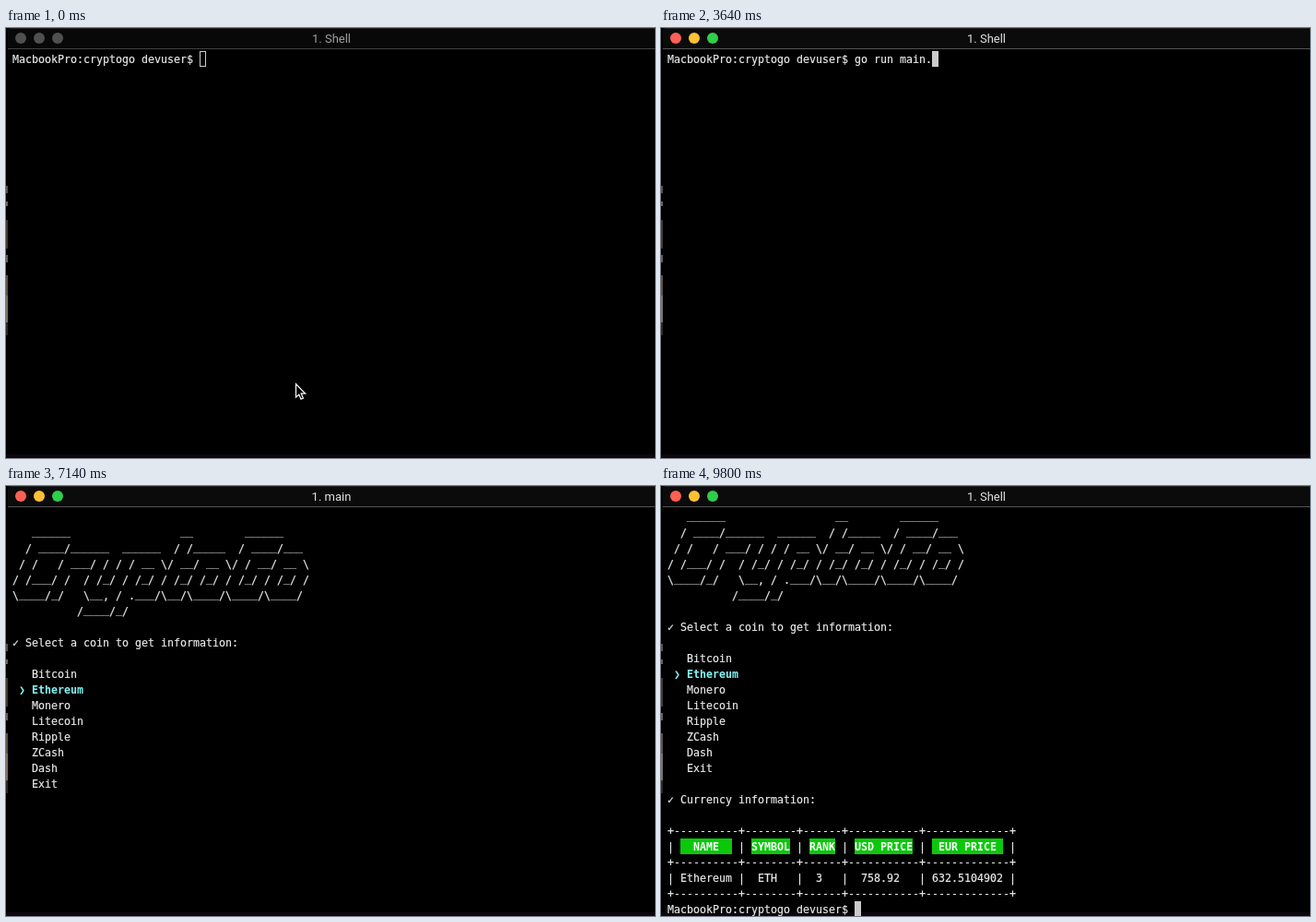
Recreate the animation shown at these times as an HTML page with a canvas. Size 704 by 466 pixels, loop 9.87 s.

```html
<!DOCTYPE html>
<html lang="en">
<head>
<meta charset="utf-8">
<title>Terminal</title>
<style>
  html, body { margin: 0; width: 100%; height: 100%; overflow: hidden; background: #000; }
  canvas { display: block; width: 704px; height: 466px; }
</style>
</head>
<body>
<canvas id="stage" width="704" height="466"></canvas>
<script>
const ctx = document.getElementById('stage').getContext('2d');
const LOOP = 9870, COL = 7, ROW = 17;
const MONO = '11.63px "DejaVu Sans Mono", monospace';
const TEXT = '#e8e8e8', BLOCK = '#cbcbcb', CYAN = '#86f5f5', GREEN = '#0bc80b';
const PROMPT = 'MacbookPro:cryptogo devuser$ ';
const COMMAND = 'go run main.go';
const KEY_TIMES = [1400, 1540, 1820, 2100, 2240, 2450, 2520, 2660, 2870, 3010, 3220, 3640, 3850, 3990];
const ACTIVE = 560, RETURN = 4200, MENU = 4690, CHOSEN = 7560, RESULT = 8610;
const LOGO = String.raw`
   ______                 __        ______
  / ____/______  ______  / /_____  / ____/___
 / /   / ___/ / / / __ \/ __/ __ \/ / __/ __ \
/ /___/ /  / /_/ / /_/ / /_/ /_/ / /_/ / /_/ /
\____/_/   \__, / .___/\__/\____/\____/\____/
          /____/_/`.split('\n');
const COINS = ['Bitcoin', 'Ethereum', 'Monero', 'Litecoin', 'Ripple', 'ZCash', 'Dash', 'Exit'];
const PICKS = [[MENU, 0], [5530, 1], [5950, 2], [6300, 3], [6650, 2], [7000, 1]];
const TITLES = [[0, '1. Shell'], [MENU, '1. link'], [5320, '1. main'], [9170, '1. Shell']];
const RULE = '+' + [10, 8, 6, 11, 13].map(n => '-'.repeat(n) + '+').join('');
const HEADERS = [[2, '  NAME  '], [13, 'SYMBOL'], [22, 'RANK'], [29, 'USD PRICE'], [41, ' EUR PRICE ']];

const latest = (steps, t) => steps.filter(([start]) => t >= start).pop()[1];

function rect(x, y, w, h, color) {
  ctx.fillStyle = color;
  ctx.fillRect(x, y, w, h);
}

function print(col, row, text, color = TEXT, bold = false, lift = 0) {
  const x = 7 + col * COL, y = 38 + row * ROW - lift;
  ctx.font = (bold ? 'bold ' : '') + MONO;
  ctx.fillStyle = ctx.strokeStyle = color;
  ctx.fillText(text, x, y);
  if (bold) return;
  // a hairline gives regular text its heavier smoothing
  ctx.lineWidth = .2;
  ctx.strokeText(text, x, y);
}

function block(col, row, filled = true) {
  const x = 7 + col * COL, y = 25 + row * ROW;
  if (filled) return rect(x, y, COL, ROW, BLOCK);
  ctx.strokeStyle = BLOCK;
  ctx.lineWidth = 1;
  ctx.strokeRect(x + .5, y + .5, COL - 1, ROW - 1);
}

function drawWindow(t) {
  const active = t >= ACTIVE;
  rect(0, 0, 704, 466, '#000');
  // sliver of desktop beside the window
  for (const [y, h, color] of [[171, 8, '#55534f'], [188, 5, '#686460'], [208, 31, '#49382b'],
    [246, 8, '#65605b'], [268, 22, '#66503f'], [290, 29, '#86705e'], [319, 14, '#302824']])
    rect(0, y, 2, h, color);
  rect(0, 462, 704, 4, '#0d070b');
  rect(2, 0, 702, 22, active ? '#0b0b0b' : '#080808');
  rect(4, 0, 700, 1, '#222');
  rect(2, 22, 702, 1, active ? '#555' : '#414141');
  ['#ff6056', '#ffc034', '#2fce4b'].forEach((color, i) => {
    ctx.fillStyle = active ? color : '#505050';
    ctx.beginPath();
    ctx.arc(16 + 20 * i, 11, 6, 0, 7);
    ctx.fill();
  });
  ctx.font = '13px Roboto, sans-serif';
  ctx.fillStyle = active ? '#e2e2e2' : '#a0a0a0';
  ctx.textAlign = 'center';
  ctx.fillText(latest(TITLES, t), 353, 16);
  ctx.textAlign = 'left';
}

function drawCommand(t) {
  const typed = COMMAND.slice(0, KEY_TIMES.filter(k => t >= k).length);
  print(0, 0, PROMPT + typed);
  if (t < RETURN) block(PROMPT.length + typed.length, 0, t >= ACTIVE);
  else block(0, 1);
}

function drawMenu(t, top) {
  LOGO.forEach((line, i) => {
    print(0, top + i, line.replace(/_/g, ' '));
    print(0, top + i, line.replace(/[^_]/g, ' '), TEXT, false, 2);
  });
  print(0, top + 8, '✓');
  print(2, top + 8, 'Select a coin to get information:');
  const pick = latest(PICKS, t);
  COINS.forEach((coin, i) => {
    const on = i === pick;
    if (on) print(1, top + 10 + i, '❯', CYAN, true);
    print(3, top + 10 + i, coin, on ? CYAN : TEXT, on);
  });
}

function drawResult() {
  print(0, 18, '✓');
  print(2, 18, 'Currency information:');
  for (const row of [20, 22, 24]) print(0, row, RULE);
  print(0, 21, RULE.replace(/-/g, ' ').replace(/\+/g, '|'));
  for (const [col, label] of HEADERS) {
    rect(7 + col * COL, 25 + 21 * ROW, label.length * COL, ROW, GREEN);
    print(col, 21, label, '#fff', true);
  }
  print(0, 23, '| Ethereum |  ETH   |  3   |  758.92   | 632.5104902 |');
  print(0, 25, PROMPT);
  block(PROMPT.length, 25);
}

function drawPointer(t) {
  const p = Math.min(1, Math.max(0, (t - 70) / 420));
  const ease = p * p * (3 - 2 * p);
  ctx.save();
  ctx.translate(314 - 18 * ease, 385 - 148 * ease);
  const arrow = new Path2D('M.5 .8V15.2L3.8 12.2L6 17.2L8.4 16.2L6.2 11.2H10.6Z');
  ctx.fillStyle = '#000';
  ctx.fill(arrow);
  ctx.strokeStyle = '#fff';
  ctx.lineWidth = 1.2;
  ctx.stroke(arrow);
  ctx.restore();
}

function frame(now) {
  const t = now % LOOP;
  drawWindow(t);
  if (t < MENU) drawCommand(t);
  else drawMenu(t, t < RESULT ? 0 : -1);
  if (t >= RESULT) drawResult();
  else if (t >= CHOSEN) block(0, 18);
  if (t < KEY_TIMES[0]) drawPointer(t);
  requestAnimationFrame(frame);
}
requestAnimationFrame(frame);
</script>
</body>
</html>
```
